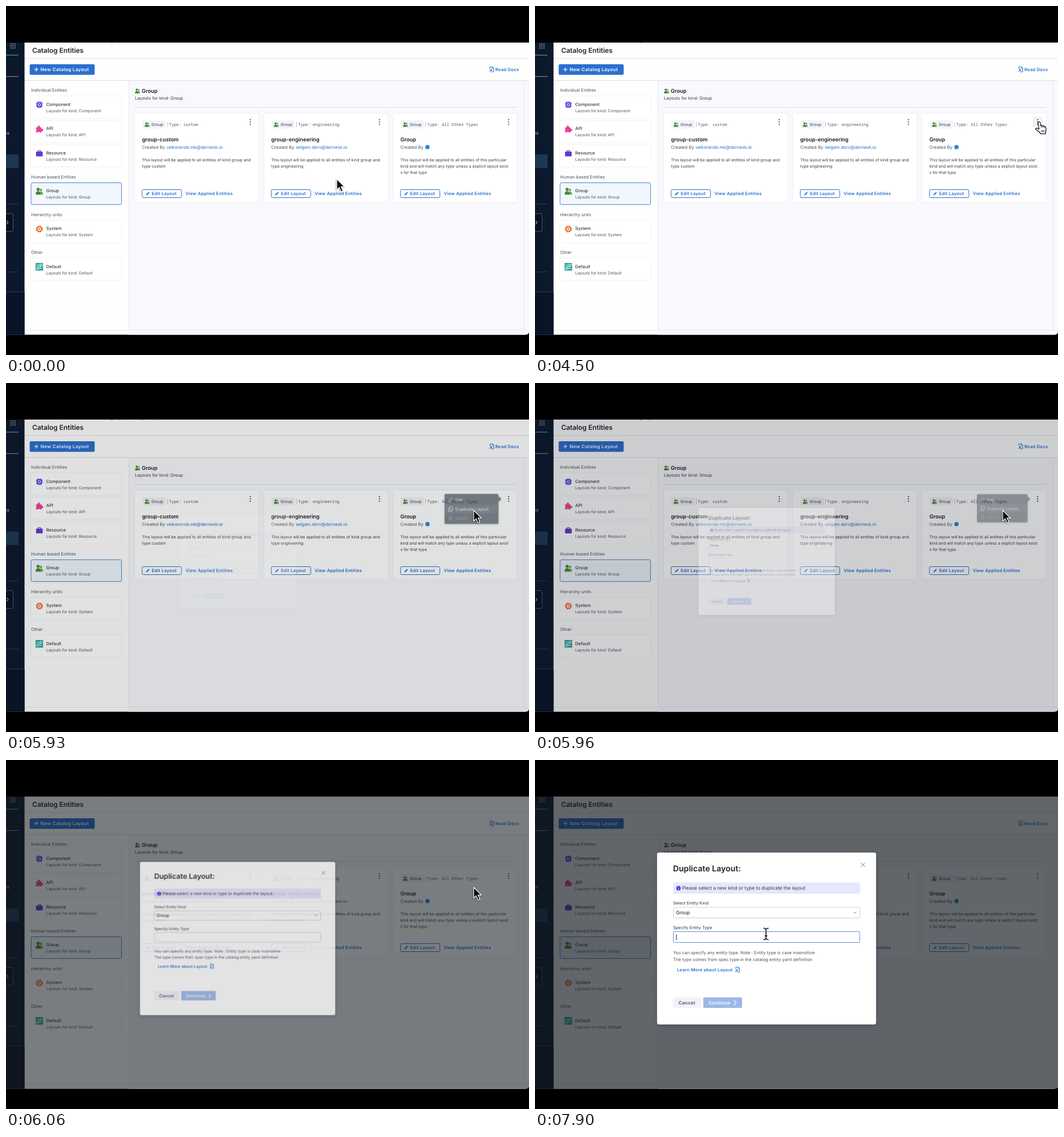
Recreate the animation shown at these times as an HTML page. Size 917 px wide and 611 px high, loop 8 s.

```html
<!DOCTYPE html>
<html lang="en">
<head>
<meta charset="utf-8">
<title>Catalog Entities</title>
<style>
html, body { margin: 0; width: 100%; height: 100%; overflow: hidden; background: #000; }
svg.stage { display: block; width: 100vw; height: 100vh; }
text { font-family: Inter, sans-serif; text-rendering: geometricPrecision; white-space: pre; fill: #383946; }
.h1 { font-size: 11.9px; font-weight: 600; fill: #22222a; }
.h2 { font-size: 9.3px; font-weight: 600; fill: #1c1c28; }
.h3 { font-size: 14.14px; font-weight: 600; fill: #22222a; }
.t14 { font-size: 8.32px; }
.t13 { font-size: 7.67px; }
.t12 { font-size: 7.05px; }
.lab { font-size: 7.4px; font-weight: 500; fill: #4f5162; }
.med { font-weight: 500; }
.soft { fill: #4f5162; }
.mono { font-family: "Noto Sans Mono", "DejaVu Sans Mono", monospace; font-size: 7.08px; fill: #4f5162; }
.link { fill: #276fd0; }
.act { font-size: 7.65px; font-weight: 600; letter-spacing: .235px; fill: #276fd0; }
.btn { font-size: 8.2px; font-weight: 600; letter-spacing: .31px; }
.white { fill: #fff; }
.line { fill: none; stroke: #dcdfe8; }
.blue { fill: none; stroke: #276fd0; }
.card { fill: #fff; filter: drop-shadow(0 .6px 1px rgba(40, 41, 61, .12)); }

.loop { animation: 8s ease-in-out infinite; }
.step { animation: 8s step-end infinite; }
#cursor { animation-name: move; }
#arrow { animation-name: arrow; }
#hand { animation-name: hand; }
#beam { animation-name: beam; }
#kebab { animation-name: kebab; }
#menu { animation-name: menu; transform-origin: 866px 203px; }
#onEdit { animation-name: onEdit; }
#onCopy { animation-name: onCopy; }
#shade { animation-name: shade; animation-timing-function: linear; }
#dialog { animation-name: dialog; transform-origin: 406px 312.5px; animation-timing-function: linear; }
#focus { animation-name: focus; }
#caret { animation-name: caret; }

@keyframes move {
  0%, .75% { transform: translate(580px, 303px); }
  10.75%, 63.25% { transform: translate(881px, 204px); }
  70.4%, 80.4% { transform: translate(820px, 223px); }
  86.6%, 100% { transform: translate(405px, 305px); }
}
@keyframes arrow { 0% { opacity: 1; } 56.25% { opacity: 0; } 74.1% { opacity: 1; } 85.6%, 100% { opacity: 0; } }
@keyframes hand { 0% { opacity: 0; } 56.25% { opacity: 1; } 74.1%, 100% { opacity: 0; } }
@keyframes beam { 0% { opacity: 0; } 85.6%, 100% { opacity: 1; } }
@keyframes kebab { 0% { opacity: 0; } 56.25% { opacity: 1; } 64.6%, 100% { opacity: 0; } }
@keyframes onEdit { 0% { opacity: 0; } 65.6% { opacity: 1; } 67%, 100% { opacity: 0; } }
@keyframes onCopy { 0% { opacity: 0; } 67%, 100% { opacity: 1; } }
@keyframes menu {
  0%, 56.9% { opacity: 0; transform: scale(.5); }
  59.1%, 73.6% { opacity: 1; transform: none; }
  74.5% { opacity: .42; transform: scale(.835); }
  75.25%, 100% { opacity: 0; transform: scale(.75); }
}
@keyframes shade {
  0%, 73.5% { opacity: 0; }
  74.5% { opacity: .2; }
  75.75% { opacity: .56; }
  76.75%, 100% { opacity: .66; }
}
@keyframes dialog {
  0%, 74% { opacity: 0; transform: scale(.5); }
  74.5% { opacity: .33; transform: scale(.62); }
  75.75% { opacity: .79; transform: scale(.89); }
  76.8% { opacity: .98; transform: scale(.985); }
  78.25%, 100% { opacity: 1; transform: none; }
}
@keyframes focus { 0% { opacity: 0; } 86.4%, 100% { opacity: 1; } }
@keyframes caret { 0% { opacity: 0; } 86.4% { opacity: 1; } 92.5% { opacity: 0; } 98.75%, 100% { opacity: 1; } }
</style>
</head>
<body>
<svg class="stage" viewBox="0 0 917 611">
  <defs>
    <clipPath id="app"><path d="M0 64H917V569Q917 575.5 910.5 575.5H0Z"/></clipPath>
    <symbol id="people" viewBox="0 0 13 13">
      <g fill="#7fa650"><circle cx="9.2" cy="4.2" r="2.1"/><path d="M6 12.2C6 8.4 7.4 7 9.2 7S12.7 8.4 12.7 12.2Z"/></g>
      <g fill="#3f8a35"><circle cx="4.4" cy="3.3" r="2.6"/><path d="M.3 12.2C.3 8 2 6.5 4.4 6.5S8.5 8 8.5 12.2Z"/></g>
    </symbol>
    <symbol id="pencil" viewBox="0 0 8 8">
      <path d="M.6 7.4L1.1 5.3L5.3 1.1L6.9 2.7L2.7 6.9ZM5.8.7Q6.4.2 7 .8T7.4 2.2Z" fill="#276fd0"/>
    </symbol>
    <symbol id="doc" viewBox="0 0 9 10">
      <path class="blue" d="M3.4 9.2H8.2V2.8L6.2.7H1.5V4.5M6 .8V3H8" />
      <path class="blue" d="M.8 8.8L4.4 5.4M2 5.2H4.6V7.8" stroke-width="1.1"/>
    </symbol>
    <symbol id="chip" viewBox="0 0 14 14">
      <path d="M4.5 1V13M7 1V13M9.5 1V13M1 4.5H13M1 7H13M1 9.5H13" stroke="#5a4fd8" stroke-width="1.1"/>
      <rect x="2.2" y="2.2" width="9.6" height="9.6" rx="1.6" fill="#5a4fd8"/>
      <rect x="5" y="5" width="4" height="4" rx=".6" fill="none" stroke="#fff" stroke-width=".9"/>
    </symbol>
    <symbol id="puzzle" viewBox="0 0 14 14">
      <path d="M1 4H4.2A2.1 2.1 0 1 1 7.8 4H11V7.2A2 2 0 1 1 11 10.4V13H7.6A1.7 1.7 0 0 0 4.4 13H1V9.8A1.7 1.7 0 0 0 1 6.8Z" fill="#ec3f94"/>
    </symbol>
    <symbol id="case" viewBox="0 0 14 14">
      <path d="M4.7 4V2.2H9.3V4" fill="none" stroke="#6338c9" stroke-width="1.3"/>
      <rect x="1" y="3.8" width="12" height="8.6" rx="1" fill="#6338c9"/>
    </symbol>
    <symbol id="gear" viewBox="0 0 14 14">
      <circle cx="7" cy="7" r="5.4" fill="none" stroke="#ef6c2f" stroke-width="1.6" stroke-dasharray="3 1.24"/>
      <circle cx="7" cy="7" r="4" fill="none" stroke="#ef6c2f" stroke-width="2"/>
      <circle cx="7" cy="7" r="1.5" fill="#ef6c2f"/>
    </symbol>
    <symbol id="flow" viewBox="0 0 14 14">
      <rect width="14" height="14" rx="1.2" fill="#27a698"/>
      <path d="M2 4H8M6 10H12M3.5 7H10.5" stroke="#fff"/>
      <path d="M8.5 2.5H12V5.5H8.5ZM2 8.5H5.5V11.5H2Z" fill="none" stroke="#fff" stroke-width=".9"/>
    </symbol>
    <path id="ibar" d="M-4-10.5Q-.4-10.5 0-7.5Q.4-10.5 4-10.5M0-7.5V6.5M-4 9.5Q-.4 9.5 0 6.5Q.4 9.5 4 9.5M-2 3H2"/>
  </defs>

  <rect width="917" height="611"/>
  <g clip-path="url(#app)">
    <rect y="64" width="917" height="512" fill="#fefefd"/>
    <rect x="215" y="131" width="702" height="445" fill="#f9f9fd"/>
    <path class="line" d="M32 92H917M32 130.5H917"/>
    <path class="line" stroke-opacity=".6" d="M215.5 131V567M908.5 131V567M32 567.5H917"/>

    <g id="nav">
      <rect y="64" width="32.5" height="512" fill="#0c182c"/>
      <rect y="501" width="32.5" height="75" fill="#0a1428"/>
      <path d="M7.8 66.5h9M7.8 70h9M7.8 73.5h9" stroke="#8b95a3" stroke-width="1.8" stroke-dasharray="1.8 1.7"/>
      <path d="M0 86H22" stroke="#5fb8ac" stroke-width="1.2"/>
      <path d="M0 123.5H20.5Q22 123.5 22 122" fill="none" stroke="#8b97a5"/>
      <text x="-2.5" y="224.5" class="t13" style="fill:#c3cad4">ns</text>
      <rect y="260" width="22" height="23.5" fill="#1d3853"/>
      <path d="M0 346.5H22M0 465.5H22M0 500.5H32" stroke="#2a3b50"/>
      <rect x="-6" y="363.5" width="18.5" height="31" rx="2.5" fill="#081322" stroke="#4b596a"/>
      <path d="M1.2 376L4 379L1.2 382" fill="none" stroke="#d5dae0"/>
    </g>

    <text x="160" y="63" class="t13 link">Catalog Layouts  Entity Group</text>
    <text x="46" y="82" class="h1">Catalog Entities</text>
    <rect x="41.5" y="102" width="114" height="18.5" rx="2.5" fill="#2a6fce"/>
    <path d="M49.7 111.2H56.7M53.2 107.7V114.7" stroke="#fff" stroke-width="1.2"/>
    <text x="60.5" y="114.2" class="btn white">New Catalog Layout</text>
    <use href="#doc" x="847" y="106" width="9" height="10"/>
    <text x="858" y="114" class="act">Read Docs</text>

    <text x="44" y="150.3" class="t13 soft">Individual Entities</text>
    <text x="44" y="301.8" class="t13 soft">Human based Entities</text>
    <text x="44" y="368" class="t13 soft">Hierarchy units</text>
    <text x="44" y="434.2" class="t13 soft">Other</text>
    <g id="kinds"></g>

    <use href="#people" x="226" y="144" width="9.5" height="9.5"/>
    <text x="238" y="152.3" class="h2">Group</text>
    <text x="226" y="164.4" class="t13">Layouts for kind: Group</text>
    <path class="line" d="M226 177.5H896"/>
    <g id="cards"></g>

    <g id="kebab" class="step">
      <rect x="874" y="195" width="15.5" height="16" rx="2" fill="#f3f4f9" stroke="#dcdee8" stroke-width=".8"/>
      <path d="M881.3 199h.01M881.3 203h.01M881.3 207h.01" stroke="#383946" stroke-width="2.2" stroke-linecap="round"/>
    </g>

    <g id="menu" class="loop">
      <path d="M759 193H861Q863 193 863 195V197.5L869 203L863 208.5V250Q863 252 861 252H759Q757 252 757 250V195Q757 193 759 193Z" fill="#2d3944" style="filter:drop-shadow(0 1px 2px rgba(20,25,40,.3))"/>
      <rect id="onEdit" class="step" x="757" y="196" width="106" height="18" fill="#3d4957"/>
      <rect id="onCopy" class="step" x="757" y="214" width="106" height="18" fill="#3d4957"/>
      <g fill="none" stroke="#e9edf1" stroke-width=".9">
        <path d="M764.5 209L765.2 206.2L770.8 200.6L772.8 202.6L767.2 208.3Z"/>
        <path d="M767 218.5H773V224.5H767ZM767 221H764.5V227.5H771V224.5"/>
        <path d="M764.5 238H772.5M767 238V236.5H770V238M765.5 238V245H771.5V238M767.6 240V243.2M769.4 240V243.2" stroke="#737d88"/>
      </g>
      <text x="778" y="208" class="t14 white">Edit</text>
      <text x="778" y="226" class="t14 white">Duplicate Layout</text>
      <text x="778" y="243.6" class="t14" style="fill:#737d88">Delete</text>
    </g>

    <rect id="shade" class="loop" y="64" width="917" height="512" fill="#12181d"/>

    <g id="dialog" class="loop">
      <rect x="214" y="162" width="384" height="301" rx="3.5" fill="#fff" style="filter:drop-shadow(0 2px 4px rgba(16,22,40,.25))"/>
      <text x="242" y="194.8" class="h3">Duplicate Layout:</text>
      <path d="M571.2 179.7L578.8 187.3M578.8 179.7L571.2 187.3" stroke="#777986"/>
      <rect x="242" y="214.5" width="328" height="19.5" fill="#e6e7fc"/>
      <circle cx="251.6" cy="224.4" r="3.9" fill="#4240d4"/>
      <path d="M251.6 222.2v.9M251.6 223.9v2.7" stroke="#fff" stroke-width="1"/>
      <text x="258" y="227.4" class="t14">Please select a new kind or type to duplicate the layout</text>

      <text x="242" y="253.4" class="lab">Select Entity Kind</text>
      <rect x="242.5" y="258" width="327" height="18.5" rx="2" fill="#fff" stroke="#cfd1da"/>
      <text x="247" y="270.4" class="t14 med">Group</text>
      <path d="M558.6 265.8L561 268.2L563.4 265.8" fill="none" stroke="#6b6d85" stroke-width=".9"/>

      <text x="242" y="296" class="lab">Specify Entity Type</text>
      <rect x="242.5" y="300.5" width="327" height="19" rx="2" fill="#fff" stroke="#cfd1da"/>
      <rect id="focus" class="step" x="242.5" y="300.5" width="327" height="19" rx="2" fill="none" stroke="#5c94dd"/>
      <path id="caret" class="step" d="M248 305V315.5" stroke="#22222a"/>

      <text x="242" y="340" class="t13 soft">You can specify any entity type. Note : Entity type is case insensitive</text>
      <text x="242" y="351.8" class="t13 soft">The type comes from spec.type in the catalog entity yaml definition</text>
      <text x="249" y="369.6" class="act">Learn More about Layout</text>
      <use href="#doc" x="350.5" y="362" width="9" height="10"/>

      <rect x="242" y="415.5" width="49" height="18.5" rx="2" fill="#f2f2f9"/>
      <text x="251.5" y="427.8" class="btn soft">Cancel</text>
      <rect x="295" y="415.5" width="68" height="18.5" rx="2" fill="#9bb8e9"/>
      <text x="304.5" y="427.8" class="btn white">Continue</text>
      <path d="M348.8 420.6L352.8 424.8L348.8 429" fill="none" stroke="#fff" stroke-width="1.2"/>
    </g>
  </g>

  <g id="cursor" class="loop">
    <path id="arrow" class="step" d="M0 0V18.6L4.3 14.6L7.5 22L10.8 20.6L7.6 13.4H13.4Z" fill="#0b0b0d" stroke="#fff" stroke-width="1.2" stroke-linejoin="round" style="filter:drop-shadow(-.5px 1px .8px rgba(0,0,0,.35))"/>
    <g id="hand" class="step">
      <path d="M1 1Q1-1.6 3-1.4Q4.4-1.3 4.8 .6L6 5.6Q7.6 4.4 8.8 6Q10.6 5 11.6 6.8Q13.8 6.2 14.4 8.6Q15.4 12 14.6 15L14 19.6H5.2Q4.6 17-1 13.6Q-4 11.4-2.8 10.2Q-1.6 9.2 .8 10.6L2.8 11.6Z" fill="#fff" stroke="#111" stroke-width="1.3" stroke-linejoin="round"/>
      <path d="M6 5.6L6.8 9M8.8 6L9.5 9.4M11.6 6.8L12.2 9.6M7 13V17M9.4 13V17M11.8 13V17" fill="none" stroke="#111" stroke-width=".9"/>
    </g>
    <g id="beam" class="step" fill="none" stroke-linecap="round">
      <use href="#ibar" stroke="#fff" stroke-width="3"/>
      <use href="#ibar" stroke="#111" stroke-width="1.6"/>
    </g>
  </g>
</svg>
<script>
const text = (x, y, cls, s) => `<text x="${x}" y="${y}" class="${cls}">${s}</text>`;
const icon = (id, x, y, size) => `<use href="#${id}" x="${x}" y="${y}" width="${size}" height="${size}"/>`;

const kinds = [
  ["Component", "chip", 158], ["API", "puzzle", 200.6], ["Resource", "case", 243.2],
  ["Group", "people", 309.5], ["System", "gear", 375.7], ["Default", "flow", 441.8],
];
document.getElementById("kinds").innerHTML = kinds.map(([name, id, y]) => {
  const picked = name === "Group" ? ' style="fill:#f1f7fd;stroke:#4b8bdc"' : "";
  return `<rect class="card" x="44" y="${y}" width="158.5" height="38" rx="2.5"${picked}/>`
    + icon(id, 51.7, y + 8, 13.6)
    + text(70.5, y + 16.7, "t13 med", name)
    + text(70.5, y + 27.7, "t12 soft", "Layouts for kind: " + name);
}).join("");

const cards = [
  { type: "custom", title: "group-custom", by: "velkoranda.mk@dornesk.io",
    lines: ["This layout will be applied to all entities of kind group and", "type custom"] },
  { type: "engineering", title: "group-engineering", by: "selgam.dorv@dornesk.io",
    lines: ["This layout will be applied to all entities of kind group and", "type engineering"] },
  { type: "All Other Types", title: "Group",
    lines: ["This layout will be applied to all entities of this particular",
      "kind and will match any type unless a explicit layout exist", "s for that type"] },
];
document.getElementById("cards").innerHTML = cards.map((c, i) =>
  `<g transform="translate(${226 + i * 226.5} 0)">
    <rect class="card" y="188" width="217" height="155.5" rx="2.5"/>
    <rect x="13" y="200" width="41" height="14.5" rx="4" fill="#f3f3fa"/>`
  + icon("people", 17, 203, 9)
  + text(29, 210, "t12", "Group")
  + `<path d="M57 203V212" stroke="#b9bbc8" stroke-width=".9"/>`
  + text(59.8, 210.2, "mono", "Type: " + c.type)
  + `<path d="M202.3 199h.01M202.3 203h.01M202.3 207h.01" stroke="#383946" stroke-width="2.2" stroke-linecap="round"/>`
  + text(12.5, 237.3, "h2", c.title)
  + text(12.5, 249.6, "t13 soft", "Created By")
  + (c.by ? text(55.4, 249.6, "t13 link", c.by) : `<circle cx="60" cy="247" r="3.8" fill="#2b86d8"/>`)
  + c.lines.map((s, n) => text(12.5, 272.3 + n * 10.7, "t12", s)).join("")
  + `<rect class="blue" x="12.7" y="321.5" width="69" height="14" rx="2" style="fill:#fff"/>`
  + icon("pencil", 19, 324.7, 7.4)
  + text(29.5, 331.4, "act", "Edit Layout")
  + text(88.7, 331.4, "act", "View Applied Entities")
  + "</g>").join("");
</script>
</body>
</html>
```
